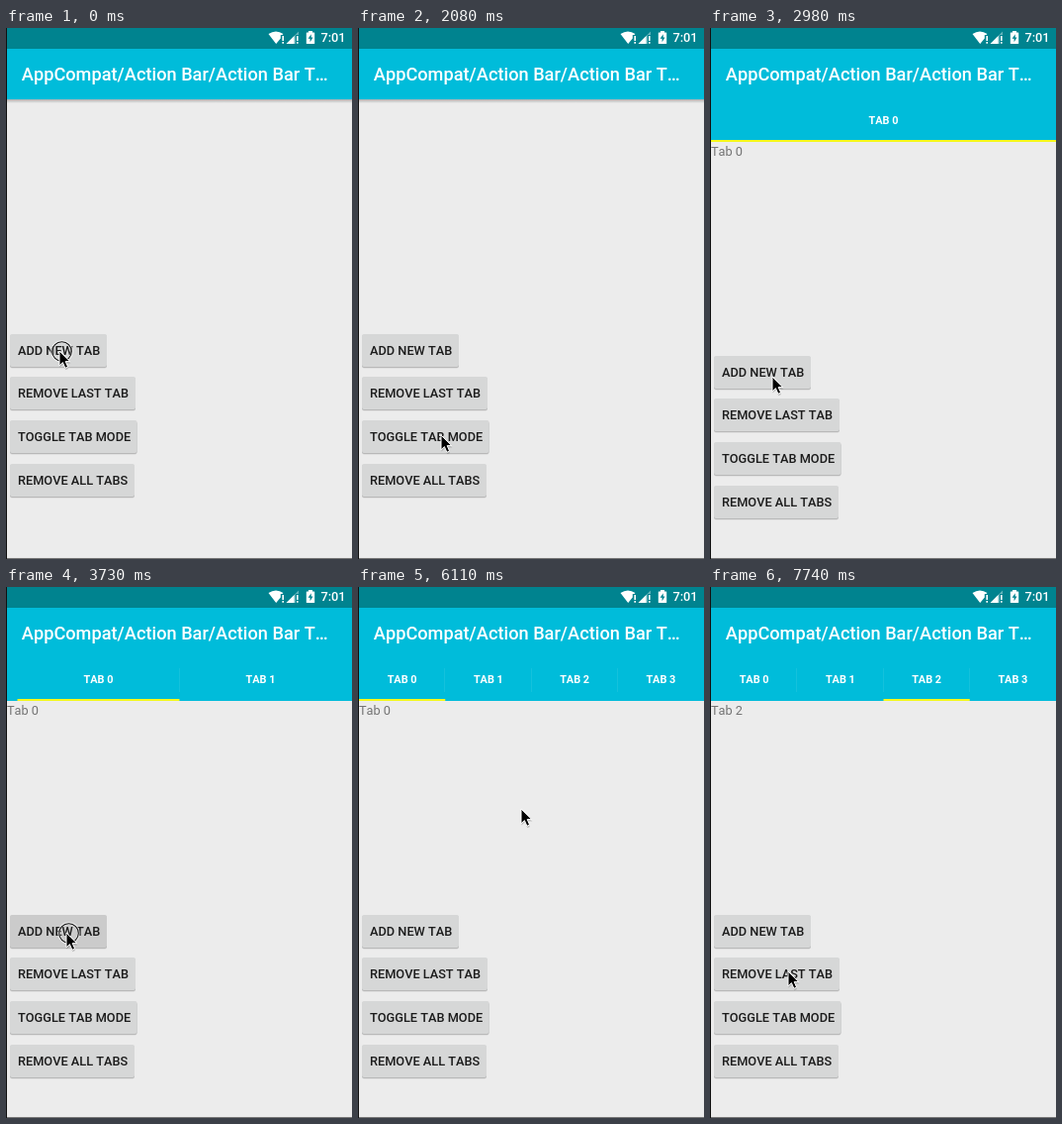
An HTML page for the animation above (8 s loop, 350x536 px).

```html
<!DOCTYPE html>
<html lang="en">
<head>
<meta charset="utf-8">
<title>Action bar tabs</title>
<style>
html, body { margin: 0; width: 100%; height: 100%; overflow: hidden; background: #ececec; }
svg { display: block; width: 350px; height: 536px; font-family: Roboto, sans-serif; font-kerning: none; }
.label { font-size: 12.75px; font-weight: 500; fill: #1c1c1c; }
.tab { font-size: 10.9px; font-weight: 700; fill: #fff; text-anchor: middle; }
</style>
</head>
<body>
<svg viewBox="0 0 350 536">
  <defs>
    <linearGradient id="fade" x2="0" y2="1">
      <stop offset="0" stop-color="#000" stop-opacity=".26"/>
      <stop offset="1" stop-color="#000" stop-opacity="0"/>
    </linearGradient>
  </defs>
  <rect width="350" height="536" fill="#ececec"/>
  <rect id="shadow" y="72" width="350" height="4" fill="url(#fade)"/>
  <rect id="bar" y="21" width="350" height="51" fill="#00bcda"/>
  <rect width="350" height="21" fill="#00838f"/>

  <g fill="#fff">
    <path d="M265.5 6Q273 .8 280.5 6L279.4 7H277.8V10.5L273.2 16Z"/>
    <path d="M279.4 8h1.6v5h-1.6zM279.4 14h1.6v1.7h-1.6z"/>
    <path d="M283.5 16L296 3.5V7H293V16Z" opacity=".4"/>
    <path d="M283.5 16L291.5 8V16ZM294 8h1.6v5H294zM294 14h1.6v1.7H294z"/>
    <path d="M306 3h4v1.4h1.6q.6 0 .6.6v10.4q0 .6-.6.6h-7.2q-.6 0-.6-.6V5q0-.6.6-.6H306z"/>
    <path d="M308.7 6.2L305.6 10.8H307.6V14.2L310.5 9.6H308.7Z" fill="#00838f"/>
    <text x="318.4" y="14.4" font-size="12.75" font-weight="500">7:01</text>
    <text x="15.8" y="53.4" font-size="18.2" font-weight="500">AppCompat/Action Bar/Action Bar T…</text>
  </g>

  <g id="tabs"></g>
  <rect id="line" y="113" height="2" fill="#f6f81b"/>
  <text id="body" x="1" y="129" font-size="12.75" fill="#747474"></text>
  <g id="buttons"></g>
  <path d="M0 535.5H350" stroke="#777"/>
  <path d="M.5 0V536" stroke="#111"/>

  <g id="ring" fill="none">
    <circle r="10" stroke="#fff" stroke-opacity=".65" stroke-width="2.6"/>
    <circle r="9.8" stroke="#111" stroke-width="1.1"/>
  </g>
  <g id="cursor">
    <path d="M0 1V15.5L3.4 12.4L6 18.2L8.6 17L6.2 11.4H11Z" fill="#000" opacity=".18" transform="translate(.4 1)"/>
    <path d="M0 0V14.8L3.4 11.6L5.9 17.3L8.6 16.1L6.2 10.6H10.8Z" fill="#000" stroke="#fff"/>
  </g>
</svg>
<script>
const LOOP = 8000, LEFT = 1, WIDE = 349, MAX_TAB = 164;
const $ = id => document.getElementById(id);

function add(parent, tag, attrs, text) {
  const el = document.createElementNS("http://www.w3.org/2000/svg", tag);
  set(el, attrs);
  if (text) el.textContent = text;
  return parent.appendChild(el);
}
function set(el, attrs) {
  for (const k in attrs) el.setAttribute(k, attrs[k]);
}

const buttons = [["ADD NEW TAB", 98], ["REMOVE LAST TAB", 127],
  ["TOGGLE TAB MODE", 128.5], ["REMOVE ALL TABS", 126]].map(([name, width], i) => {
  const y = Math.round(308.8 + i * 43.65), box = { x: 4, width, height: 33, rx: 2 };
  add($("buttons"), "rect", { ...box, y: y + 1.6, opacity: .1 });
  add($("buttons"), "rect", { ...box, y: y + .8, opacity: .18 });
  const face = add($("buttons"), "rect", { ...box, y });
  const ripple = add($("buttons"), "rect", { x: 16, y, width: width - 15.5, height: 33 });
  add($("buttons"), "text", { x: 12, y: y + 21, class: "label" }, name);
  return { face, ripple };
});
const tabs = [0, 1, 2, 3].map(i => {
  const g = add($("tabs"), "g", {});
  const divider = add(g, "rect", { y: 82, width: 1, height: 24, fill: "#fff", opacity: i ? .08 : 0 });
  const label = add(g, "text", { y: 97.4, class: "tab" }, "TAB " + i);
  return { g, divider, label };
});

const moves = [
  [0, 54, 326], [1790, 66, 350], [1930, 89, 398], [2080, 84, 411],
  [2680, 80, 398], [2830, 69, 366], [2980, 63, 352], [3130, 61, 349],
  [5960, 92, 318], [6110, 165, 224], [6260, 234, 136], [6400, 251, 106], [6550, 223, 98],
  [7300, 207, 132], [7450, 142, 270], [7590, 90, 370], [7740, 79, 388]
];
const clicks = [[0, 150], [740, 890], [2380, 2530], [3730, 3870], [4320, 4460], [5060, 5210], [6850, 7000]];
const added = [2380, 3730, 4320, 5210];
const within = (t, a, b) => t >= a && t < b;

function draw(t) {
  const [, x, y] = moves.filter(m => m[0] <= t).pop();
  const count = added.filter(a => a <= t).length;
  const picked = t >= 6850 ? 2 : 0;
  const width = count == 2 ? MAX_TAB : WIDE / Math.max(count, 1);
  const start = count == 2 ? LEFT + (WIDE - 2 * MAX_TAB) / 2 : LEFT;

  set($("bar"), { height: count ? 94 : 51 });
  set($("shadow"), { opacity: count ? 0 : 1 });
  tabs.forEach((tab, i) => {
    set(tab.g, { visibility: i < count ? "visible" : "hidden" });
    set(tab.label, { x: start + width * (i + .5) });
    set(tab.divider, { x: Math.round(start + width * i) - 1 });
  });
  set($("line"), { x: start + width * picked, width: count ? width : 0 });
  $("body").textContent = count ? "Tab " + picked : "";

  set($("buttons"), { transform: `translate(0 ${count ? 22 : 0})` });
  const pressed = within(t, 3730, 3870) || within(t, 4320, 4460) ? 0 : -1;
  const rippling = within(t, 2380, 2530) ? 2 : -1;
  buttons.forEach((b, i) => {
    set(b.face, { fill: i == pressed ? "#cbcbcb" : "#d6d7d7" });
    set(b.ripple, { opacity: i == rippling ? .05 : 0 });
  });

  set($("cursor"), { transform: `translate(${x} ${y})` });
  set($("ring"), {
    transform: `translate(${x + 2.5} ${y + .5})`,
    visibility: clicks.some(c => within(t, ...c)) ? "visible" : "hidden"
  });
}

const begin = performance.now();
function tick() {
  draw((performance.now() - begin) % LOOP);
  requestAnimationFrame(tick);
}
draw(0);
requestAnimationFrame(tick);
</script>
</body>
</html>
```
